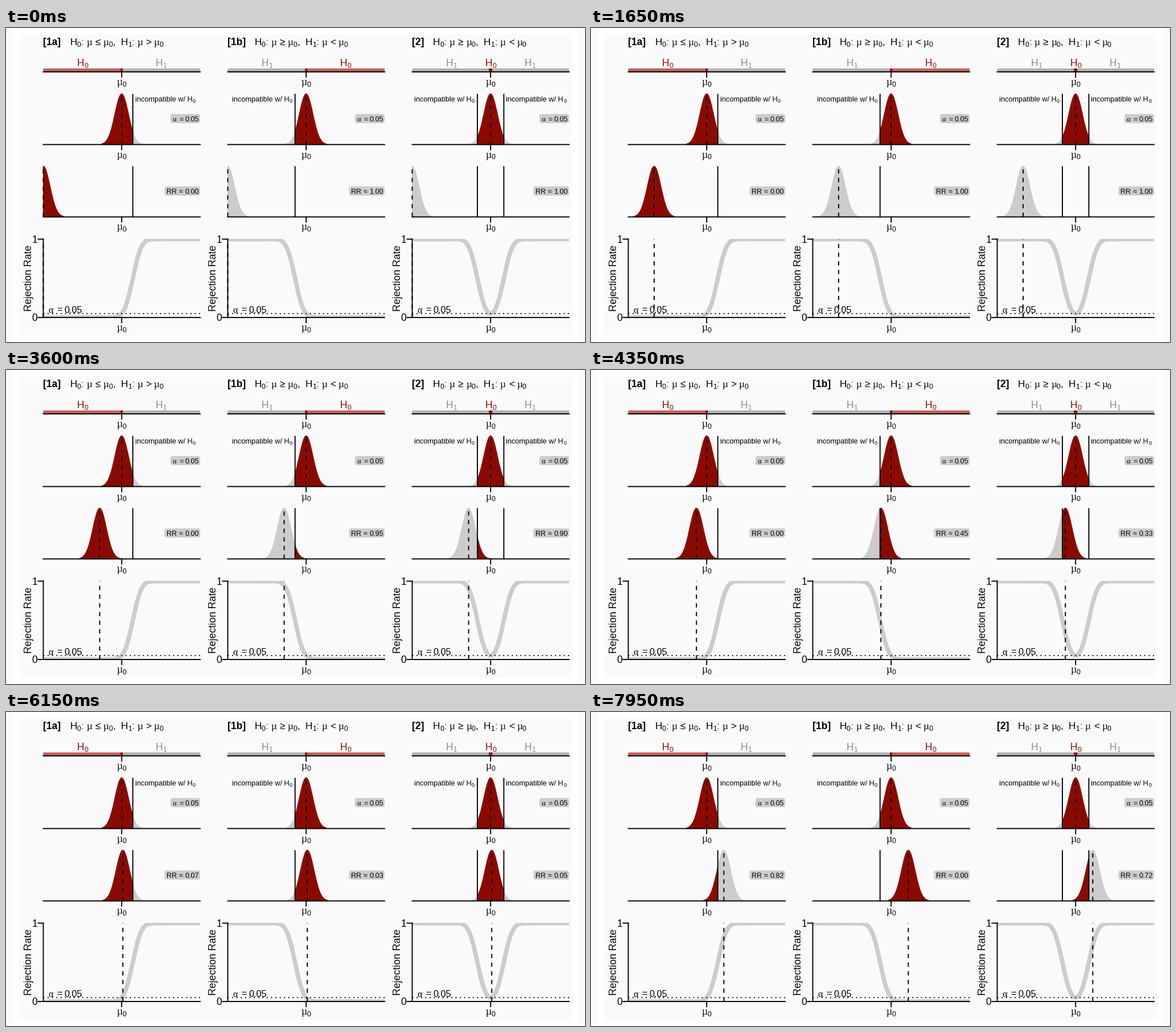
A matplotlib script for the animation above (8000 ms loop, 1017 by 551 pixels).

```python
import math

import matplotlib.pyplot as plt
import numpy as np
from matplotlib.animation import FuncAnimation
from matplotlib.patches import FancyBboxPatch, Polygon, Rectangle

W, H, DPI = 1017, 551, 64
FRAMES, INTERVAL = 160, 50
PT = 72 / DPI  # points per pixel

RED, PALE_RED = "#8b0a00", "#c0605c"
SILVER, BAR_GRAY, LABEL_GRAY = "#cccccc", "#b0b0b0", "#8c8c8c"
PAPER = "#fafafa"

SIGMA = 11.85          # standard error in pixels
HALF, WIDTH = 137.7, 275.5
BELL_HEIGHT = 89
TOP, BOTTOM = 370.5, 508
LINE = 1.9

# Advance widths in em; everything else counts as a digit.
EM = {"H": .722, "R": .722, "µ": .576, "α": .631, "m": .833, "w": .722, "c": .5}
EM.update(dict.fromkeys("≤≥≈=<>", .549))
EM.update(dict.fromkeys(" .,:/t", .278))
EM.update(dict.fromkeys("il", .222))

fig = plt.figure(figsize=(W / DPI, H / DPI), dpi=DPI, facecolor=PAPER)
ax = fig.add_axes([0, 0, 1, 1])
ax.set(xlim=(0, W), ylim=(H, 0))
ax.axis("off")


def phi(z):
    return (1 + math.erf(z / math.sqrt(2))) / 2


def rect(x0, x1, y0, y1, color):
    ax.add_patch(Rectangle((x0, y0), x1 - x0, y1 - y0, fc=color, lw=0,
                           snap=False))


def line(xs, ys, lw=LINE, color="black", **kw):
    return ax.plot(xs, ys, color=color, lw=lw * PT, snap=False, **kw)[0]


def dashed(x, y0, y1):
    return line([x, x], [y0, y1], ls=(0, (4, 4)), dash_capstyle="butt")


def label(x, y, s, size=17.5, color="black", font="Liberation Sans", **kw):
    return ax.text(x, y, s, fontsize=size * PT, color=color, family=font,
                   va="baseline", **kw)


def formula(x, y, markup, size=17.5, color="black", center=False):
    """Set tokens split by '|' side by side; a leading '_' makes a subscript."""
    tokens = []
    for token in markup.split("|"):
        sub = token.startswith("_")
        s = token[1:] if sub else token
        scale = size * (.7 if sub else 1)
        tokens.append((s, scale, size * .17 if sub else 0,
                       scale * sum(EM.get(c, .556) for c in s)))
    if center:
        x -= sum(t[3] for t in tokens) / 2
    texts = []
    for s, scale, drop, advance in tokens:
        if s.strip():
            font = "Liberation Serif" if s in "µα" else "Liberation Sans"
            texts.append(label(x, y + drop, s, scale, color, font))
        x += advance
    return texts


def badge(x0, x1, y, markup):
    r = 4
    ax.add_patch(FancyBboxPatch((x0 + r, y - 8 + r), x1 - x0 - 2 * r, 16 - 2 * r,
                                boxstyle=f"round,pad={r},rounding_size={r}",
                                fc=SILVER, lw=0))
    return formula(x0 + 3.5, y + 4.7, markup, 12.6)


class Panel:
    def __init__(self, x0, tag, gap, relations, left, right):
        self.x0, self.mid, self.x1 = x0, x0 + HALF, x0 + WIDTH
        two_sided = left and right
        z = 1.96 if two_sided else 1.645
        self.left = -z if left else None
        self.right = z if right else None
        self.cuts = [self.mid + c * SIGMA
                     for c in (self.left, self.right) if c is not None]
        self.keep = (self.cuts[0] if left else self.x0,
                     self.cuts[-1] if right else self.x1)
        self.header(tag, gap, relations)
        self.hypotheses(two_sided)
        self.null_row()
        self.true_row()
        self.power_row()

    def rate(self, shift):
        lower = phi(self.left - shift) if self.left else 0
        upper = phi(shift - self.right) if self.right else 0
        return lower + upper

    def header(self, tag, gap, relations):
        label(self.x0, 30, tag, weight="bold")
        r0, r1 = relations
        formula(self.x0 + gap, 30, f"H|_0|:| |µ| |{r0}| |µ|_0|,|  |"
                                   f"H|_1|:| |µ| |{r1}| |µ|_0", 17.3)

    def axis(self, y):
        line([self.x0, self.x1], [y, y])
        line([self.mid, self.mid], [y, y + 9])
        formula(self.mid, y + 23, "µ|_0", center=True)

    def hypotheses(self, two_sided):
        mid = self.mid
        null_left = self.left is None
        sides = [(self.x0, mid, null_left),
                 (mid, self.x1, not null_left and not two_sided)]
        for a, b, null in sides:
            rect(a, b, 71, 76.5, PALE_RED if null else BAR_GRAY)
            formula((a + b) / 2, 67, "H|_0" if null else "H|_1",
                    color=RED if null else LABEL_GRAY, center=True)
        half = 3 if two_sided else 2
        rect(mid - half, mid + half, 71, 77, RED)
        if two_sided:
            formula(mid, 67, "H|_0", color=RED, center=True)
        self.axis(77)

    def bell_points(self, mean, base, lo, hi):
        x = np.clip(mean + SIGMA * np.linspace(-3, 3, 121), lo, hi)
        y = base - BELL_HEIGHT * np.exp(-((x - mean) / SIGMA) ** 2 / 2)
        return np.vstack([np.column_stack([x, y]), [x[-1], base], [x[0], base]])

    def bells(self, mean, base):
        ranges = [(self.x0, self.x1), self.keep]
        return [self.bell_points(mean, base, *r) for r in ranges]

    def bell_row(self, mean, base):
        patches = [ax.add_patch(Polygon(p, fc=c, ec=c, lw=1.2 * PT,
                                        joinstyle="round"))
                   for p, c in zip(self.bells(mean, base), (SILVER, RED))]
        self.axis(base)
        for x in self.cuts:
            line([x, x], [base - BELL_HEIGHT, base], solid_capstyle="butt")
        return patches, dashed(mean, base, base - BELL_HEIGHT)

    def null_row(self):
        self.bell_row(self.mid, 204.5)
        note = "incompatible w/ H|_0"
        if self.left:
            formula(self.cuts[0] - 111, 128.5, note, 12.8)
        if self.right:
            formula(self.cuts[-1] + 4, 128.5, note, 12.8)
        badge(self.x0 + 223.5, self.x1, 159, "α| |=| |0.05")

    def true_row(self):
        self.patches, self.bell_mark = self.bell_row(self.x0, 331.5)
        self.rate_text = badge(self.x0 + 213, self.x1, 286, "RR| |≈| |0.00")[-1]

    def power_row(self):
        x0, x1 = self.x0, self.x1
        x = np.linspace(x0, x1, 300)
        y = [BOTTOM - (BOTTOM - TOP) * self.rate((v - self.mid) / SIGMA) for v in x]
        curve = line(x, y, 7.6, SILVER, zorder=1.5, solid_capstyle="butt")
        curve.set_clip_path(Rectangle((x0, TOP - .8), WIDTH, BOTTOM - TOP + .8,
                                      transform=ax.transData))
        alpha_y = BOTTOM - .05 * (BOTTOM - TOP)
        line([x0, x1], [alpha_y, alpha_y], ls=(0, (1, 3)), dash_capstyle="butt")
        formula(x0 + 9, 499.5, "α| |=| |0.05", 16.2)
        self.axis(BOTTOM)
        line([x0, x0], [TOP, BOTTOM])
        for y, s in ((TOP, "1"), (BOTTOM, "0")):
            line([x0 - 9, x0], [y, y])
            label(x0 - 15.2, y + 6.3, s, ha="center")
        label(x0 - 20.5, 438.5, "Rejection Rate", 17.8, ha="center", rotation=90,
              rotation_mode="anchor")
        self.power_mark = dashed(x0, BOTTOM, TOP)

    def update(self, shift):
        mean = self.mid + shift * SIGMA
        for patch, points in zip(self.patches, self.bells(mean, 331.5)):
            patch.set_xy(points)
        for mark in (self.bell_mark, self.power_mark):
            mark.set_xdata([mean, mean])
        self.rate_text.set_text(f"{self.rate(shift):.2f}")


rect(12, 1005, 0, H, "white")
rect(23, 994, 11, 540, PAPER)
panels = [
    Panel(65.5, "[1a]", 47, "≤>", left=False, right=True),
    Panel(389.5, "[1b]", 47, "≥<", left=True, right=False),
    Panel(713.5, "[2]", 36.5, "≥<", left=True, right=True),
]


def draw(i):
    # The true mean sweeps steadily but slows down around the null value.
    shift = np.interp(i, [0, 96, 142.6, 160], [-11.62, -.473, .64, 2.66])
    for panel in panels:
        panel.update(shift)
    return []


anim = FuncAnimation(fig, draw, frames=FRAMES, interval=INTERVAL,
                     init_func=lambda: draw(0), repeat=True, repeat_delay=0)
plt.show()
```
